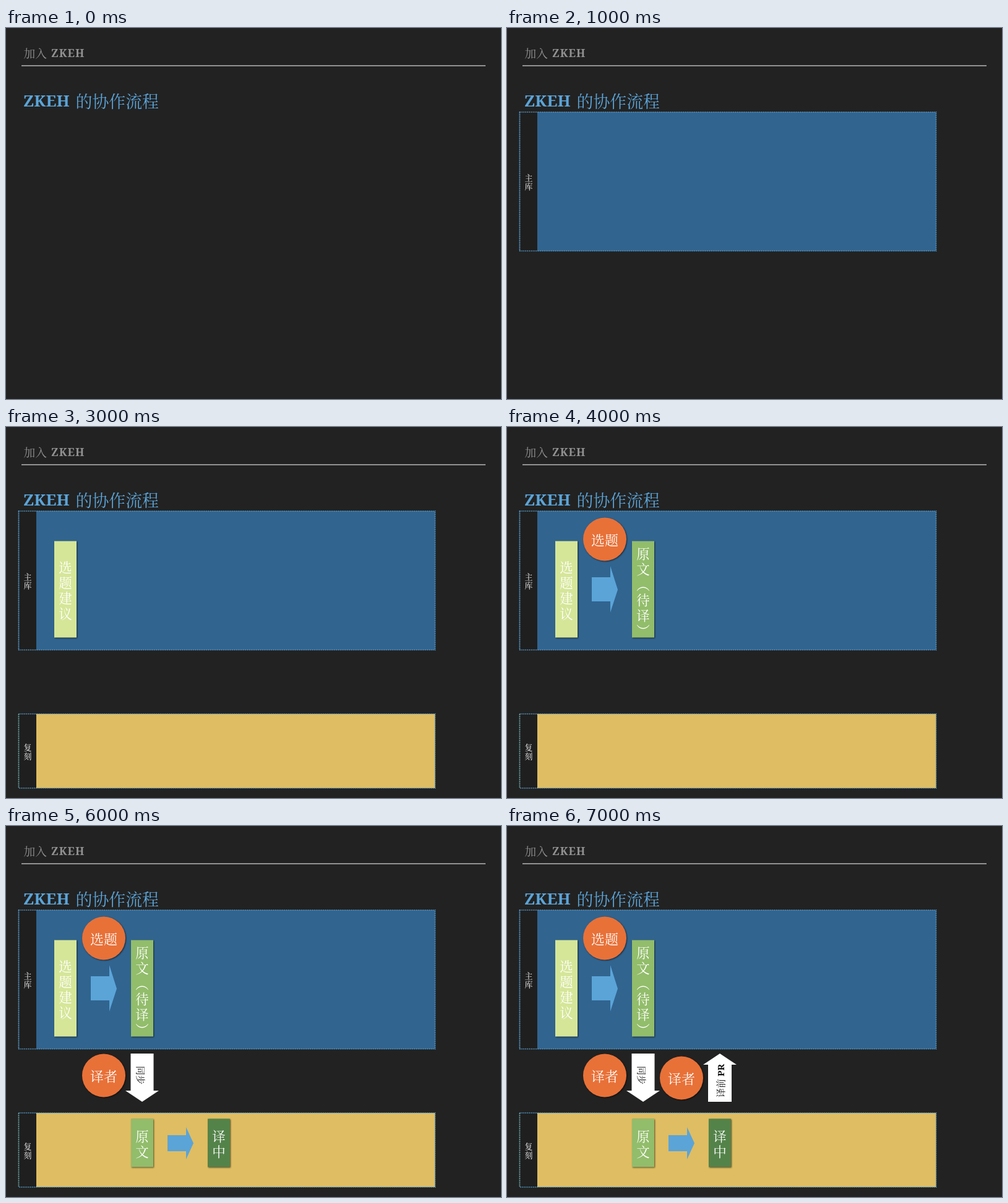
Recreate the animation shown at these times as an HTML page. Size 800 by 600 pixels, loop 8 s.

```html
<!DOCTYPE html>
<html lang="zh-CN">
<head>
<meta charset="utf-8">
<style>
  html, body { margin: 0; width: 100%; height: 100%; overflow: hidden; background: #222; }
  svg { display: block; width: 100vw; height: 100vh; }
  text { font-family: "Noto Serif CJK SC", "Noto Sans CJK SC", "Noto Sans CJK", serif; font-weight: 300; fill: #fff; }
  .latin { font-family: "Noto Serif", serif; font-weight: 700; }
  .mid { text-anchor: middle; }
  .shade { filter: drop-shadow(1px 1px 1.2px rgba(0, 0, 0, .6)); }
</style>
</head>
<body>
<svg id="stage" viewBox="0 0 800 600"></svg>
<script>
const STEP = 1000, LOOP = 8000;
const ORANGE = '#e87138', SKY = '#5ba4d8', GREEN = '#92bd6b';

const rect = (x, y, w, h, fill, extra = '') =>
  `<rect x="${x}" y="${y}" width="${w}" height="${h}" fill="${fill}" ${extra}/>`;

const label = (x, y, size, str, extra = 'class="mid"') =>
  `<text x="${x}" y="${y}" dy=".38em" font-size="${size}" ${extra}>${str}</text>`;

// Characters stacked from the first centre y
const column = (x, y, size, pitch, str) =>
  [...str].map((c, i) => label(x, y + i * pitch, size, c)).join('');

const lane = (y, h, fill, edge, str, textY) =>
  rect(20.5, y, 28.5, h, '#1f1f1f') +
  rect(49, y, 644.5, h, fill) +
  rect(20.5, y, 673, h, 'none', `stroke="${SKY}" stroke-width="1.6" stroke-dasharray="1.6 1.4"`) +
  `<path d="M20.5 ${y}V${y + h}" stroke="${edge}" stroke-width="1.4" stroke-dasharray="1.6 1.4"/>` +
  column(35, textY, 13, 14, str);

const card = (x, y, h, fill, str, textY) =>
  rect(x, y, 36, h, fill, 'class="shade"') + column(x + 18, textY, 21.5, 25, str);

const role = (x, y, str) =>
  `<circle cx="${x}" cy="${y}" r="35" fill="${ORANGE}" class="shade"/>` + label(x, y + 1, 22, str);

const arrow = (d, fill) => `<path d="${d}" fill="${fill}"/>`;

const steps = [
  label(28.5, 41, 18.7, '加入', 'style="fill:#929292"') +
  '<text x="73" y="47" font-size="17.5" letter-spacing="1" class="latin" style="fill:#929292">ZKEH</text>' +
  rect(25, 60, 750, 2, '#929292') +
  `<text x="28" y="127" font-size="26" class="latin" style="fill:${SKY}">ZKEH</text>` +
  label(112.5, 118.5, 26.9, '的协作流程', `style="fill:${SKY}"`),

  lane(136, 224.5, '#31648f', SKY, '主库', 242),

  lane(464, 120, '#dfbd62', '#79a58b', '复刻', 518.5),

  card(78, 184.5, 156, '#d5e698', '选题建议', 227),

  role(158, 181.5, '选题') +
  arrow('M137 243H167V225L179 263L167 300V282H137Z', SKY) +
  card(202, 184.5, 156, GREEN, '原文︵待译︶', 205),

  role(158, 403.5, '译者') +
  arrow('M201.5 368H238.5V428H247L220 446L193 428H201.5Z', '#fff') +
  label(0, 0, 15, '同步', 'class="mid" transform="translate(218 403) rotate(90)" style="fill:#111"') +
  card(202, 473.5, 78, GREEN, '原文', 502),

  arrow('M261 500H291V487L303 513L291 539V526H261Z', SKY) +
  card(326, 473.5, 78, '#54834a', '译中', 502),

  role(282, 407.5, '译者') +
  arrow('M344 368L371 386H363V446H325V386H317Z', '#fff') +
  '<g transform="translate(345 439) rotate(-90)">' +
  label(0, 0, 15, '译前', 'style="fill:#111"') +
  '<text x="34" y="5.5" font-size="15" class="latin" style="fill:#111">PR</text></g>'
];

const stage = document.getElementById('stage');
stage.innerHTML = steps.map(s => `<g>${s}</g>`).join('');
const groups = [...stage.children];

function draw(t) {
  groups.forEach((g, i) => g.setAttribute('visibility', t >= i * STEP ? 'visible' : 'hidden'));
}

const start = performance.now();
function tick() {
  draw((performance.now() - start) % LOOP);
  requestAnimationFrame(tick);
}
tick();
</script>
</body>
</html>
```
